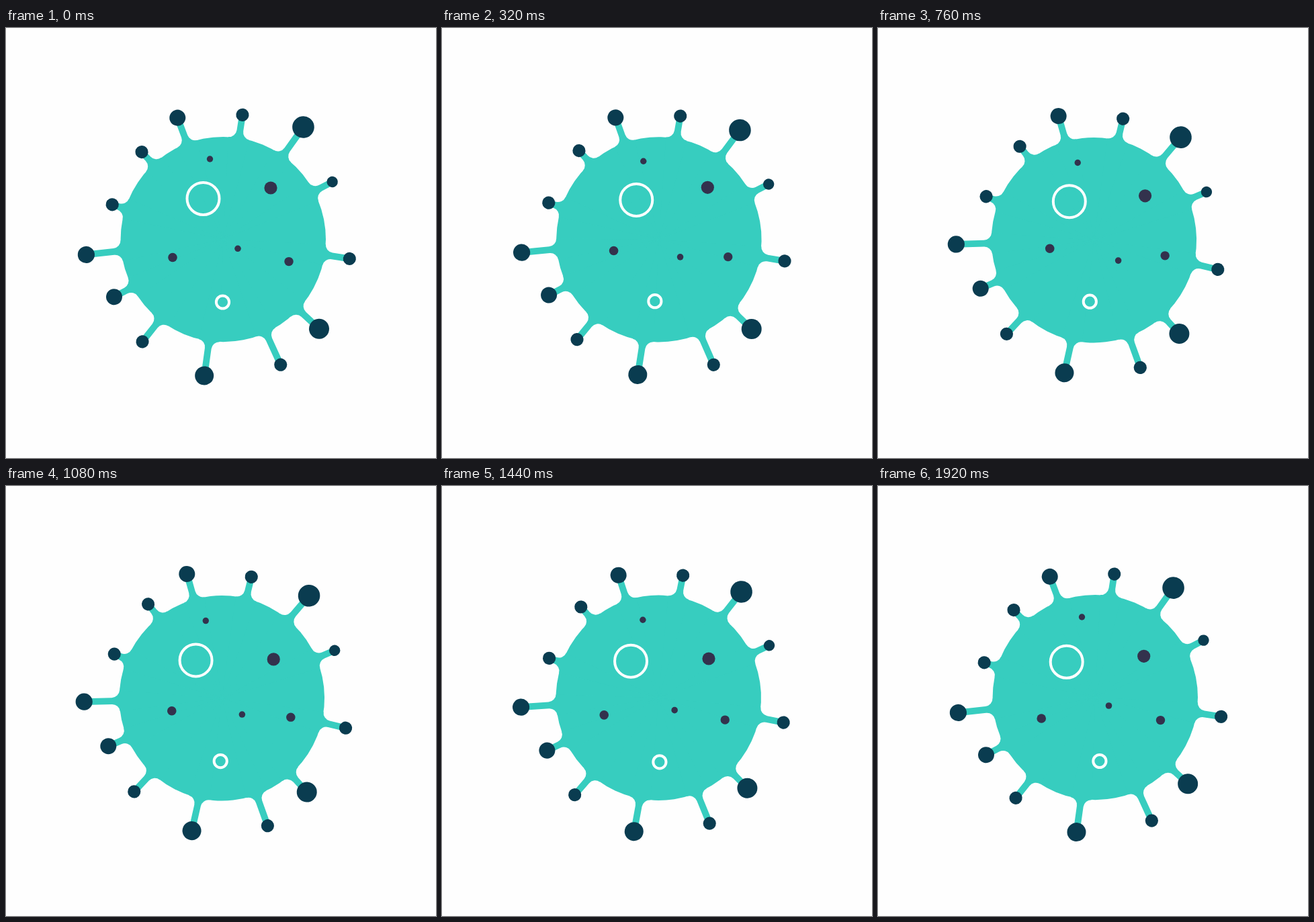
These frames come from a looping animation (640x640 px, 1960 ms). An HTML page with a canvas:

```html
<!DOCTYPE html>
<html lang="en">
<head>
<meta charset="utf-8">
<title>Virus cell</title>
<style>
html, body { margin: 0; width: 100%; height: 100%; overflow: hidden; background: #fefefe; }
canvas { display: block; }
</style>
</head>
<body>
<canvas id="stage" width="640" height="640"></canvas>
<script>
const ctx = document.getElementById('stage').getContext('2d');
const LOOP = 1960, STEP = 40, SWING = 1920, SETTLE = 620;
const TAU = Math.PI * 2, DEG = Math.PI / 180;
const TEAL = '#37cdbf', NAVY = '#0a3c50', PLUM = '#33324d', WHITE = '#fff', PAPER = '#fefefe';
const pivot = { x: 309, y: 292 }, center = { x: 323.3, y: 314.6 };
const bodyR = 152.7, stemHalf = 4.9, fillet = 12;

const smooth = u => u * u * (3 - 2 * u);

// Equivalent of cubic-bezier(.5, 0, .5, 1)
function ease(p) {
  let lo = 0, hi = 1;
  for (let i = 0; i < 30; i++) {
    const s = (lo + hi) / 2;
    if (1.5 * s * (1 - s) + s ** 3 < p) lo = s; else hi = s;
  }
  return smooth(lo);
}

// Natural-ended spline through evenly spaced values, u from 0 to 1
function spline(v, u) {
  const last = v.length - 1;
  const i = Math.min(Math.floor(u * last), last - 1), f = u * last - i;
  const inner = k => (v[k + 1] - v[k - 1]) / 2;
  const slope = k =>
    k === 0 ? 2 * (v[1] - v[0]) - inner(1) :
    k === last ? 2 * (v[last] - v[last - 1]) - inner(last - 1) : inner(k);
  return v[i] + (v[i + 1] - v[i]) * smooth(f)
    + f * (1 - f) * ((1 - f) * slope(i) - f * slope(i + 1));
}

function disc(x, y, r, color) {
  ctx.beginPath();
  ctx.arc(x, y, r, 0, TAU);
  ctx.fillStyle = color;
  ctx.fill();
}

// A stem with rounded feet; the stretch shrinks away after the loop starts
function spike(t, angle, reach, r, stretch = 0) {
  const length = reach + stretch * (1 - smooth(Math.min(t / SETTLE, 1)));
  const side = stemHalf + fillet;
  const foot = Math.sqrt((bodyR + fillet) ** 2 - side ** 2);
  const touch = Math.atan2(side, -foot);
  ctx.save();
  ctx.rotate(angle * DEG);
  ctx.beginPath();
  ctx.moveTo(length, -stemHalf);
  ctx.arc(foot, -side, fillet, Math.PI / 2, touch);
  ctx.lineTo(0, 0);
  ctx.arc(foot, side, fillet, -touch, -Math.PI / 2);
  ctx.lineTo(length, stemHalf);
  ctx.fillStyle = TEAL;
  ctx.fill();
  disc(length, 0, r, NAVY);
  ctx.restore();
}

function drawBody(t) {
  ctx.save();
  ctx.translate(pivot.x, pivot.y);
  ctx.rotate(5 * DEG * ease(1 - Math.abs(2 * t / SWING - 1)));
  ctx.translate(center.x - pivot.x, center.y - pivot.y);
  disc(0, 0, bodyR, TEAL);
  spike(t, 8.7, 189.5, 9.6, 0.7);
  spike(t, 43, 188.5, 15, 6.6);
  spike(t, 65.4, 201.8, 9.6, 3.4);
  spike(t, 97.9, 202.4, 14, 2.4);
  spike(t, 128.3, 190.8, 9.6, 3.2);
  spike(t, 152.2, 183.5, 12);
  spike(t, 173.6, 205.2, 12.6);
  spike(t, 197.4, 173, 9.6);
  spike(t, 227, 177.8, 9.6);
  spike(t, 249.4, 192, 12, 1.3);
  spike(t, 278.8, 185.7, 9.6, 1.8);
  spike(t, 305.5, 200.2, 16.3, 5);
  spike(t, 332.2, 182.2, 8.2, 1.4);
  ctx.restore();
}

// Position along a path of a few points, crossed once per loop
const along = (t, xs, ys) => [spline(xs, t / SWING), spline(ys, t / SWING)];

function dot(t, r, xs, ys) {
  disc(...along(t, xs, ys), r, PLUM);
}

function ring(t, r, xs, ys) {
  ctx.beginPath();
  ctx.arc(...along(t, xs, ys), r, 0, TAU);
  ctx.lineWidth = 4;
  ctx.strokeStyle = WHITE;
  ctx.stroke();
}

function draw(now) {
  const t = Math.floor((now % LOOP) / STEP) * STEP;
  ctx.fillStyle = PAPER;
  ctx.fillRect(0, 0, 640, 640);
  drawBody(t);
  dot(t, 4.7, [303.5, 297.6, 298, 303.5], [195, 200.1, 200, 195]);
  dot(t, 9.6, [394, 396, 398.3, 397, 395.7], [238, 239.5, 256.5, 257, 253.3]);
  dot(t, 6.8, [248, 257.2, 242.5, 243.2], [341.5, 327.7, 338.7, 346]);
  dot(t, 4.8, [345, 358.2, 347.8, 343.5], [328.3, 346.3, 336, 327]);
  dot(t, 6.7, [421, 427.5, 422, 420.5], [347.6, 338.2, 347, 348.6]);
  ring(t, 24, [293.5, 283.3, 280.7], [254, 259, 261.8]);
  ring(t, 9.6, [322.5, 314.9, 322, 329.9], [408, 406.7, 410.6, 409.5]);
}

function tick() {
  draw(performance.now());
  requestAnimationFrame(tick);
}
tick();
</script>
</body>
</html>
```
